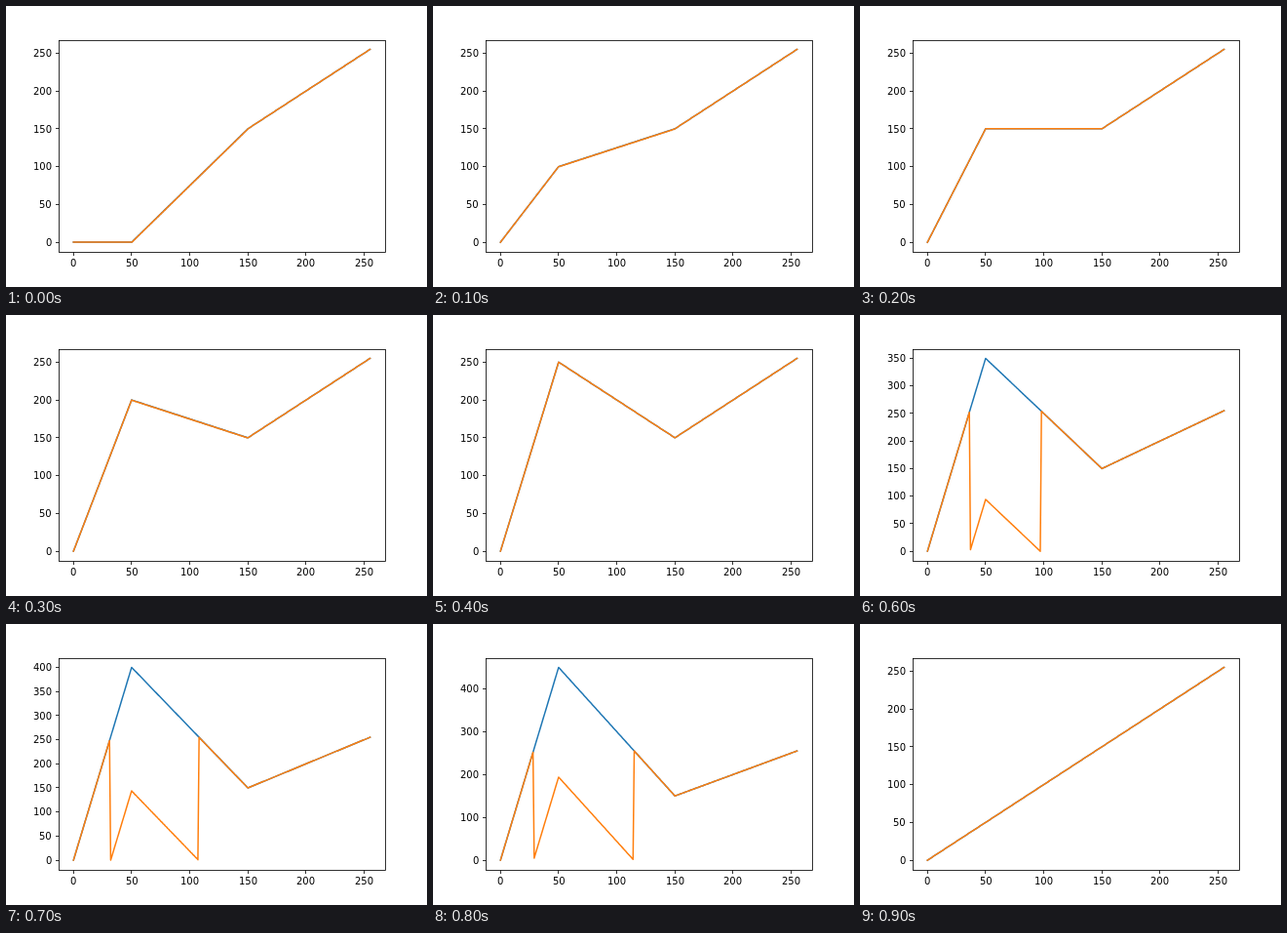
Animation of 432 by 288 pixels, one loop 1 s. Source, as an HTML page with a canvas:

```html
<!DOCTYPE html>
<html lang="en">
<head>
<meta charset="utf-8">
<style>
html, body { margin: 0; width: 100%; height: 100%; overflow: hidden; background: #fff; }
canvas { display: block; }
</style>
</head>
<body>
<canvas id="plot" width="432" height="288"></canvas>
<script>
const ctx = document.getElementById('plot').getContext('2d');
const KNEES = [0, 100, 150, 200, 250, 300, 350, 400, 450, 50]; // height at x = 50, one per 100 ms
const LEFT = 54, RIGHT = 388.8, TOP = 34.56, BOTTOM = 252;

// Piecewise-linear curve through (0, 0), (50, knee), (150, 150), (255, 255)
function curve(x, knee) {
  if (x <= 50) return x * knee / 50;
  if (x <= 150) return knee + (150 - knee) * (x - 50) / 100;
  return x;
}

const scale = (v, max, from, to) => from + (to - from) * (v / max + 0.05) / 1.1;
const px = x => scale(x, 255, LEFT, RIGHT);
const snap = v => Math.floor(v) + 0.5;

function segment(x1, y1, x2, y2) {
  ctx.beginPath();
  ctx.moveTo(x1, y1);
  ctx.lineTo(x2, y2);
  ctx.stroke();
}

function label(text, x, y, align) {
  const left = x - ctx.measureText(text).width * align;
  ctx.fillText(text, Math.round(left), Math.round(y));
}

function draw(knee) {
  const max = Math.max(255, knee);
  const py = y => scale(y, max, BOTTOM, TOP);

  function plot(color, f) {
    ctx.strokeStyle = color;
    ctx.beginPath();
    for (let x = 0; x < 256; x++) ctx.lineTo(px(x), py(f(x)));
    ctx.stroke();
  }

  ctx.fillStyle = '#fff';
  ctx.fillRect(0, 0, 432, 288);

  ctx.lineWidth = 1.5;
  ctx.lineJoin = 'round';
  ctx.lineCap = 'square';
  plot('#1f77b4', x => curve(x, knee));
  plot('#ff7f0e', x => Math.floor(curve(x, knee)) % 256); // 8-bit wraparound

  ctx.lineWidth = 0.8;
  ctx.lineJoin = 'miter';
  ctx.lineCap = 'butt';
  ctx.strokeStyle = ctx.fillStyle = '#000';
  ctx.font = '10px "DejaVu Sans", sans-serif';
  ctx.strokeRect(54.5, 35.5, 335, 217);

  for (let v = 0; v <= 250; v += 50) {
    const x = px(v);
    segment(snap(x), 252.5, snap(x), 256);
    label(String(v), x, 267, 0.5);
  }
  const step = max > 400 ? 100 : 50;
  for (let v = 0; v <= max; v += step) {
    const y = py(v);
    segment(51, snap(y), 54.5, snap(y));
    label(String(v), 47, y + 3.8, 1);
  }
}

function tick() {
  draw(KNEES[Math.floor(performance.now() % 1000 / 100)]);
  requestAnimationFrame(tick);
}
tick();
</script>
</body>
</html>
```
